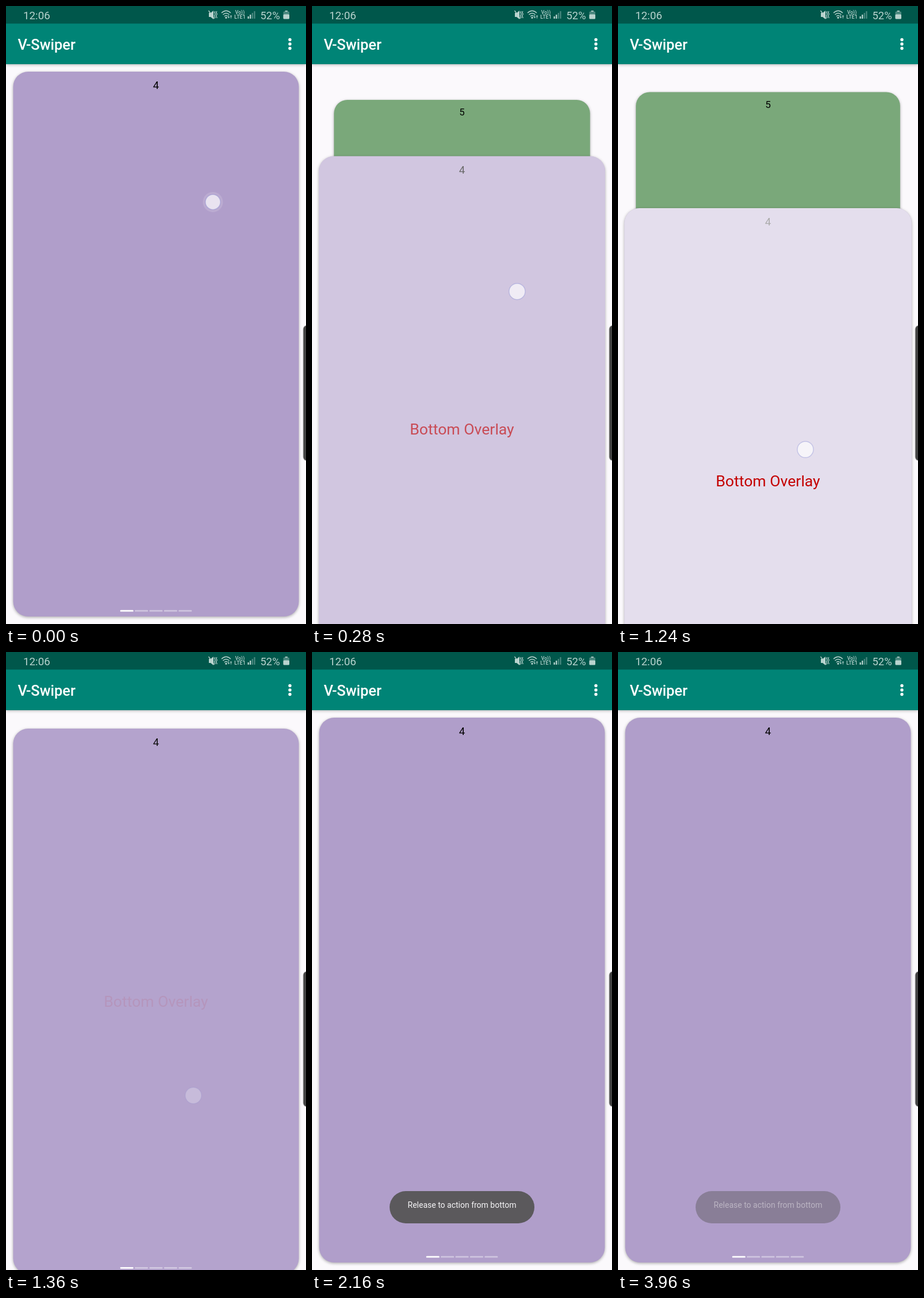
Recreate the animation shown at these times as an HTML page with a canvas. Size 522x1073 px, loop 4000 ms.

```html
<!DOCTYPE html>
<html lang="en">
<head>
<meta charset="utf-8">
<title>V-Swiper</title>
<style>
html, body { margin: 0; width: 100%; height: 100%; overflow: hidden; background: #fbf9fc; }
canvas { display: block; }
</style>
</head>
<body>
<canvas id="stage" width="522" height="1073"></canvas>
<script>
const ctx = document.getElementById('stage').getContext('2d');
const LOOP = 4000, MAX_DRAG = 237, RELEASE = 1250;
const CARD = { x: 12.5, y: 114, w: 497, h: 946, r: 26 };
const MID = { x: 261, y: 587 };
const STATUS = '#b9d3ce';

// Touch path: time, x, y, vertical speed
const TOUCH = [[0, 360, 340, .4], [280, 357, 495, .7], [600, 333, 728, .38], [840, 326, 770, 0]];

const clamp = v => Math.max(0, Math.min(1, v));

function box(x, y, w, h, r, fill) {
  ctx.beginPath();
  ctx.roundRect(x, y, w, h, r);
  ctx.fillStyle = fill;
  ctx.fill();
}

function disc(x, y, r, fill) {
  ctx.beginPath();
  ctx.arc(x, y, r, 0, 7);
  ctx.fillStyle = fill;
  ctx.fill();
}

function text(s, x, y, size, fill, align = 'left', weight = 400) {
  ctx.font = `${weight} ${size}px Roboto, sans-serif`;
  ctx.textAlign = align;
  ctx.fillStyle = fill;
  ctx.fillText(s, x, y);
}

function withAlpha(alpha, draw) {
  ctx.save();
  ctx.globalAlpha = alpha;
  draw();
  ctx.restore();
}

function shadow(color, blur, dy, draw) {
  ctx.save();
  ctx.shadowColor = color;
  ctx.shadowBlur = blur;
  ctx.shadowOffsetY = dy;
  draw();
  ctx.restore();
}

function touchAt(t) {
  const i = TOUCH.findIndex(k => k[0] > t);
  if (i < 0) return { x: 326, y: 770 };
  const [t0, x0, y0, v0] = TOUCH[i - 1], [t1, x1, y1, v1] = TOUCH[i];
  const d = t1 - t0, u = (t - t0) / d, e = u * u * (3 - 2 * u);
  const y = y0 + (y1 - y0) * e + d * u * (1 - u) * (v0 * (1 - u) - v1 * u);
  return { x: x0 + (x1 - x0) * (i === 2 ? u : e), y };
}

function dragAt(t) {
  if (t < RELEASE) return Math.max(0, Math.min(MAX_DRAG, touchAt(t).y - 349));
  return MAX_DRAG * (1 - clamp((t - RELEASE) / 155)) ** 2;
}

function card(label, fill, pad = 0) {
  shadow('rgba(0,0,0,.32)', 5, 1.5, () =>
    box(CARD.x - pad, CARD.y, CARD.w + 2 * pad, CARD.h, CARD.r, fill));
  text(label, MID.x, 144, 18.6, '#000', 'center');
}

function drawCards(drag) {
  const p = drag / MAX_DRAG, scale = .85 + .075 * p, pad = 1.3 * p * p;
  ctx.save();
  ctx.translate(MID.x, MID.y);
  ctx.scale(scale, scale);
  ctx.translate(-MID.x, -MID.y);
  card('5', '#7aa87a');
  ctx.restore();

  ctx.save();
  ctx.translate(0, drag);
  card('4', '#b09eca', pad);
  for (let i = 0; i < 5; i++) {
    box(198.7 + i * 25.4, 1048.8, 23, 2.8, 1.2, i ? 'rgba(255,255,255,.4)' : '#fff');
  }
  withAlpha(p, () => {
    box(CARD.x - pad, CARD.y, CARD.w + 2 * pad, CARD.h, CARD.r, 'rgba(255,255,255,.667)');
    text('Bottom Overlay', MID.x, 597, 26.6, '#c40000', 'center');
  });
  ctx.restore();
}

function drawTouch(t) {
  const { x, y } = touchAt(t);
  withAlpha(1 - clamp((t - 1270) / 150), () => {
    if (t < 100) disc(x, y, 17.5, `rgba(255,255,255,${.14 * (1 - t / 100)})`);
    const r = t < 100 ? 13 + t / 100 : 14;
    disc(x, y, r, 'rgba(255,255,255,.67)');
    ctx.strokeStyle = 'rgba(130,135,210,.38)';
    ctx.lineWidth = 1.4;
    ctx.stroke();
  });
}

function drawToast(t) {
  const alpha = t < 3000 ? clamp((t - 1620) / 500) : 1 - clamp((t - 3580) / 520) ** 2;
  if (!alpha) return;
  withAlpha(alpha, () => {
    box(135, 936, 252, 56, 28, '#5b595c');
    text('Release to action from bottom', MID.x, 965, 14, '#f6f5f7', 'center');
  });
}

function line(path, width) {
  ctx.strokeStyle = STATUS;
  ctx.lineWidth = width;
  ctx.stroke(new Path2D(path));
}

function drawStatus() {
  box(0, 0, 522, 30.5, 0, '#00574b');
  text('12:06', 30, 22.5, 18.8, STATUS);
  text('52%', 442.5, 22.5, 18.4, STATUS);

  // Muted speaker
  ctx.fillStyle = STATUS;
  ctx.fill(new Path2D('M353 12h3l5-4v15l-5-4h-3z'));
  line('M352.5 8l10 14M364 9l-1.4 2 1.6 3-1.6 3 1.6 4M367 9l-1.4 2 1.6 3-1.6 3 1.6 4', 1.3);

  // Wi-Fi with traffic arrows
  line('M375 12q8-7.5 16 0M377.5 15q5.500-5 11 0M380 18q3-3 6 0', 1.5);
  disc(383, 20.3, 1.6, STATUS);
  line('M387.500 16v5m-1.500-1.700 1.500 1.700 1.500-1.700M391.500 21.500v-5m-1.500 1.700 1.500-1.700 1.500 1.700', 1);

  text('Vo))', 407, 14, 8.6, STATUS, 'center', 500);
  text('LTE1', 407, 22.3, 9, STATUS, 'center', 500);

  for (let i = 0; i < 4; i++) {
    const h = 4 + i * 3;
    withAlpha(i < 2 ? 1 : .4, () => box(420.5 + i * 3.6, 22 - h, 2.3, h, 0, STATUS));
  }

  // Battery
  withAlpha(.4, () => box(482.5, 9.5, 10.5, 13, 1.5, STATUS));
  box(485.5, 8, 4.5, 1.8, .5, STATUS);
  box(482.5, 14.5, 10.5, 8, 1.5, STATUS);
}

function drawToolbar() {
  shadow('rgba(0,0,0,.3)', 5, 1, () => box(0, 30, 522, 71, 0, '#008476'));
  text('V-Swiper', 20.5, 75.7, 25.4, '#fff', 'left', 500);
  for (const y of [58.5, 66, 73.5]) disc(494, y, 2.7, '#fff');
}

function draw(t) {
  box(0, 0, 522, 1073, 0, '#fbf9fc');
  drawCards(dragAt(t));
  drawToolbar();
  drawStatus();
  drawToast(t);
  drawTouch(t);
  box(516.5, 554, 20, 236, 7, 'rgba(140,140,140,.5)');
  box(517.5, 555, 20, 234, 6, '#434343');
}

const start = performance.now();
function frame() {
  draw((performance.now() - start) % LOOP);
  requestAnimationFrame(frame);
}
frame();
</script>
</body>
</html>
```
